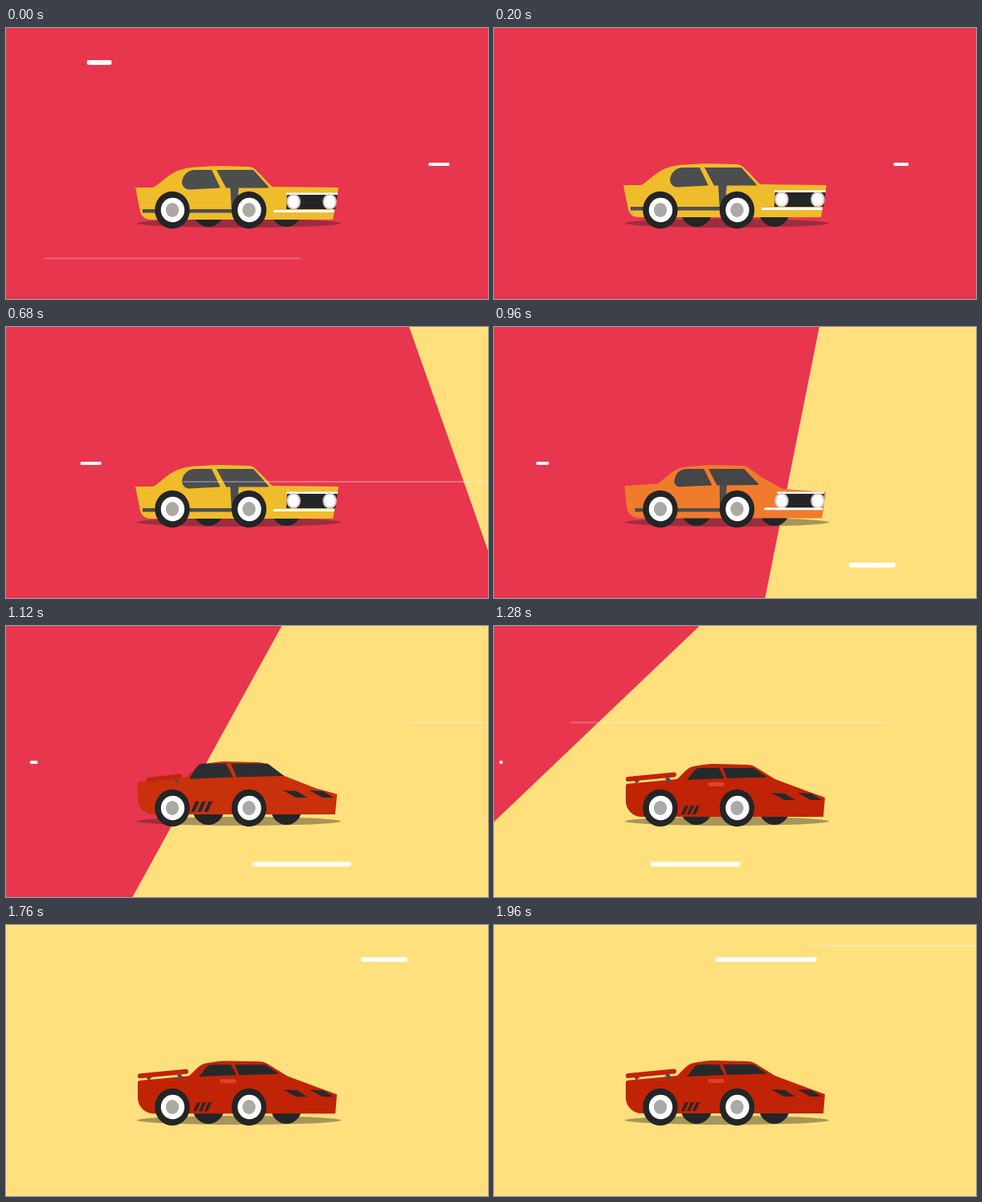
Animation, 600 px wide and 338 px high, one loop 2 s. Source, as an HTML page with a canvas:

```html
<!DOCTYPE html>
<html lang="en">
<head>
<meta charset="utf-8">
<title>Changing car</title>
<style>
  html, body { margin: 0; width: 100%; height: 100%; overflow: hidden; background: #e8364e; }
  canvas { display: block; width: 600px; height: 338px; }
</style>
</head>
<body>
<canvas id="stage" width="600" height="338"></canvas>
<script>
const ctx = document.getElementById('stage').getContext('2d');
const LOOP = 2000, STEP = 40;
const RED = '#e8364e', SAND = '#ffe07d', DARK = '#232526', WHITE = '#fff';

const ramp = (t, from, to) => Math.max(0, Math.min(1, (t - from) / (to - from)));
const smooth = (t, from, to) => { const p = ramp(t, from, to); return p * p * (3 - 2 * p); };
const mix = (a, b, p) => Array.isArray(a) ? a.map((v, i) => mix(v, b[i], p)) : a + (b - a) * p;
const rgb = c => `rgb(${c.map(Math.round)})`;

// Outlines are corners [x, y, radius], first for the classic, then for the racer.
const BODY = [
  [[161, 199, 0], [184, 199, 8], [214, 175, 60], [262, 172, 90], [307, 173, 12], [318, 184, 0],
   [331, 198, 2], [414, 199, 0], [407, 239, 0], [169, 239, 12]],
  [[164, 197, 3], [228, 191, 6], [243, 176, 22], [268, 172, 60], [321, 173, 20], [350, 191, 12],
   [390, 206, 0], [412, 214, 1], [410, 238, 0], [164, 238, 20]]
];
const REAR_GLASS = [
  [[217, 202, 9], [222, 177, 16], [256, 177, 1], [267, 199.5, 1]],
  [[240, 192, 0], [252, 177, 8], [280, 177, 0], [287, 190, 0]]
];
const FRONT_GLASS = [
  [[262, 177, 0], [308, 177, 2], [328, 199.5, 1], [274, 199.5, 1]],
  [[285, 177, 0], [323, 177, 4], [340, 188.5, 0], [290, 190, 0]]
];
const YELLOW = [239, 188, 43], ORANGE = [240, 119, 44], SCARLET = [193, 35, 6];
const GREY = [76, 77, 79], INK = [38, 41, 44];

function shape(points, fill) {
  const n = points.length, [x0, y0] = points[0], [x1, y1] = points[1];
  ctx.beginPath();
  ctx.moveTo((x0 + x1) / 2, (y0 + y1) / 2);
  for (let i = 1; i <= n; i++) {
    const [x, y, r = 0] = points[i % n], [nx, ny] = points[(i + 1) % n];
    ctx.arcTo(x, y, nx, ny, r);
  }
  ctx.closePath();
  ctx.fillStyle = fill;
  ctx.fill();
}
function oval(x, y, rx, ry, fill) {
  ctx.beginPath();
  ctx.ellipse(x, y, rx, ry, 0, 0, 7);
  ctx.fillStyle = fill;
  ctx.fill();
}
function line(x0, y0, x1, y1, width, color, cap = 'butt') {
  ctx.beginPath();
  ctx.moveTo(x0, y0);
  ctx.lineTo(x1, y1);
  ctx.lineWidth = width;
  ctx.lineCap = cap;
  ctx.strokeStyle = color;
  ctx.stroke();
}
function faded(alpha, draw) {
  if (alpha <= 0) return;
  ctx.save();
  ctx.globalAlpha = alpha;
  draw();
  ctx.restore();
}
function scaled(x, y, sx, sy, draw) {
  ctx.save();
  ctx.translate(x, y);
  ctx.scale(sx, sy);
  ctx.translate(-x, -y);
  draw();
  ctx.restore();
}

// A sand-coloured half plane turns about a point above the stage.
function background(t) {
  ctx.fillStyle = RED;
  ctx.fillRect(0, 0, 600, 338);
  const angle = Math.max(-90, Math.min(90, (t - 857) * 0.1095));
  ctx.save();
  ctx.translate(440, -176);
  ctx.rotate(angle * Math.PI / 180);
  ctx.fillStyle = SAND;
  ctx.fillRect(0, -1500, 1500, 3000);
  ctx.restore();
}

function wheel(x) {
  oval(x, 227, 21.7, 23.3, DARK);
  oval(x + 0.5, 227, 14.7, 15.3, WHITE);
  oval(x, 227, 8.2, 9, '#aca8a4');
}

function classicTrim(m) {
  const k = Math.min(1, m * 2), grey = rgb(GREY);
  line(mix(170, 176, k), 228.3, 290, 228.3, 4.6, grey);
  shape([[mix(279, 281, k), 196], [290, 196], [287, 230], [281, 230]], grey);
  const left = mix(350, 354, k), right = mix(413, 411, k);
  shape([[left, 206], [right, 206], [right - 3, 226], [left - 1, 226]], DARK);
  line(left - 1, 206.8, right, 206.8, 2.6, WHITE);
  for (const x of [358, 403]) {
    oval(x, 216.8, 8.8, 9.8, '#d5c6c6');
    oval(x, 216.8, 6.7, 7.8, WHITE);
  }
  const bumper = mix(228.5, 226.5, k);
  line(mix(333, 337, k), bumper, 409, bumper, 3, WHITE);
}

function racerTrim(t, pop) {
  const ink = rgb(INK);
  for (const x of [345, 378]) shape([[x, 208], [x + 17, 209], [x + 30, 217], [x + 16, 217]], ink);
  scaled(250, 237, pop, pop, () => {
    for (let x = 238; x < 256; x += 7) shape([[x, 224], [x + 4, 224], [x - 1, 235], [x - 5, 235]], ink);
  });
  faded(ramp(t, 1160, 1240), () => line(269, 197.5, 284, 197.5, 5, '#e2402f', 'round'));
}

function spoiler(grow) {
  ctx.save();
  ctx.translate(0, 4 * (1 - grow));
  scaled(200, 188, mix(0.7, 1, grow), mix(0.8, 1, grow), () => {
    for (const x of [175, 215]) line(x, 189, x + 4, 195, 5, '#5c4b45');
    line(167, 191, 224, 185.5, 6, rgb(SCARLET), 'round');
  });
  ctx.restore();
}

function car(t) {
  const m = smooth(t, 740, 1200);
  const late = m * m;
  const pop = 1 + 0.17 * Math.sin(Math.PI * ramp(t, 1000, 1240));
  const paint = rgb(m < 0.5 ? mix(YELLOW, ORANGE, m * 2) : mix(ORANGE, SCARLET, m * 2 - 1));
  const glass = rgb(mix(GREY, INK, late));
  const swing = Math.cos((t / 306.8 - 0.05) * 2 * Math.PI);
  const bob = -3 * ramp(swing, 0.5, -0.5);

  oval(290, 243.5, 127, 5.5, 'rgba(35,37,38,.4)');
  oval(252, 227, 20, 21, DARK);
  oval(349, 227, 19.5, 21, DARK);

  ctx.save();
  ctx.translate(0, bob);
  shape(mix(...BODY, m), paint);
  faded(1 - ramp(t, 980, 1080), () => classicTrim(m));
  scaled(290, 191, pop, pop, () => {
    shape(mix(...REAR_GLASS, late), glass);
    shape(mix(...FRONT_GLASS, late), glass);
  });
  faded(ramp(t, 1000, 1100), () => {
    racerTrim(t, pop);
    spoiler(ramp(t, 1120, 1240));
  });
  ctx.restore();

  wheel(207);
  wheel(302.5);
}

function dash(left, right, y, width) {
  const length = right - left;
  if (length < 1) return;
  ctx.beginPath();
  ctx.roundRect(left, y - width / 2, length, width, Math.min(width / 3, length / 2));
  ctx.fillStyle = WHITE;
  ctx.fill();
}

// The head shoots out and settles; the tail follows and closes the gap.
function shot(t, y) {
  const head = Math.sin(ramp(t, 0, 717) * Math.PI / 2), tail = smooth(t, 28, 768);
  dash(mix(503, 93, head), mix(503, 93, tail), y, 6);
}

// A slow drift with one quick rush.
function drifter(t) {
  dash(526 - 0.143 * t - 336 * smooth(t, 200, 640), 552 - 0.18 * t - 311 * smooth(t, 240, 680), 170, 4);
}

function hairline(t, enter, length, y) {
  const left = 600 - (t - enter) * 2.5;
  line(left, y, left + length, y, 1.8, 'rgba(255,255,255,.28)');
}

function streaks(t) {
  drifter(t);
  shot(t - 892, 297);
  shot((t + 308) % LOOP, 43 - (t > 308 && t < 1692 ? 100 : 0));
  hairline(t, -221, 319, 287.3);
  hairline(t, 528, 400, 193);
  hairline(t, 1078, 400, 120.3);
  hairline(t, 1877, 400, 26);
}

const start = performance.now();
function frame() {
  const now = (performance.now() - start) % LOOP;
  const t = Math.floor(now / STEP) * STEP;
  background(t);
  car(t);
  streaks(t);
  requestAnimationFrame(frame);
}

// The upper dash spans the loop seam: its end plays first, its start last.
streaks = (draw => draw)(function (t) {
  drifter(t);
  shot(t - 892, 297);
  shot(t < 1000 ? t + 628 : t - 1692, 43);
  hairline(t, -221, 319, 287.3);
  hairline(t, 528, 400, 193);
  hairline(t, 1078, 400, 120.3);
  hairline(t, 1877, 400, 26);
});
frame();
</script>
</body>
</html>
```
